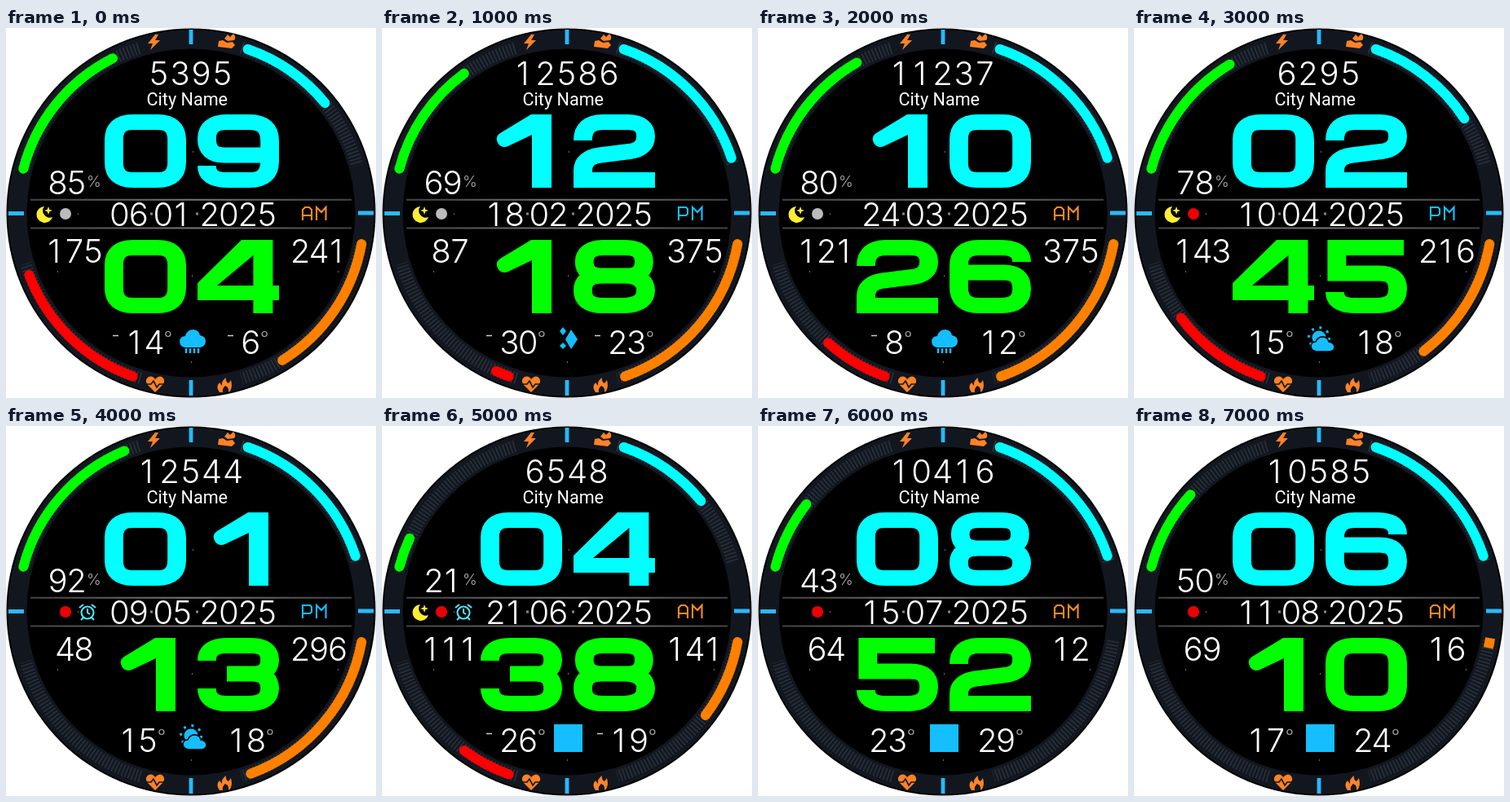
Recreate the animation shown at these times as an HTML page. Size 454 px wide and 454 px high, loop 8000 ms.

```html
<!DOCTYPE html>
<html lang="en">
<head>
<meta charset="utf-8">
<title>Watch face</title>
<style>
  html, body { margin: 0; height: 100%; overflow: hidden; background: #fff; }
  svg { display: block; width: 100vw; height: 100vh; }
  text { fill: #fff; font: 300 40px Inter, sans-serif; text-anchor: middle; }
  .city { font: 400 21.6px Roboto, sans-serif; }
  .percent { font-size: 19px; fill: #aaa; }
  .line { fill: none; stroke-width: 2.1; }
</style>
</head>
<body>
<svg viewBox="0 0 454 454">
  <defs>
    <linearGradient id="rule">
      <stop offset="0" stop-color="#444"/><stop offset=".5" stop-color="#777"/><stop offset="1" stop-color="#444"/>
    </linearGradient>
  </defs>
  <circle cx="227" cy="227" r="226.5"/>
  <circle cx="227" cy="227" r="213" fill="none" stroke="#12171f" stroke-width="23"/>
  <g id="ticks" fill="none" stroke="#28303b" stroke-width="15" stroke-dasharray="1.7 2.6"></g>
  <path d="M227 2V20M227 432V451M3 227.5H22M432 227H451" stroke="#28b9fa" stroke-width="4.8"/>
  <path d="M30 209.7H424V211.7H30ZM30 244.6H424V246.6H30Z" fill="url(#rule)"/>
  <path d="M229 152h1M228 304h1M63 299h1M407 299h1M227 410h1M88 228h1" stroke="#ddd"/>
  <g fill="#ff8228">
    <path d="M183 8L174 19H180L177 27L189 15H183L187 8Z"/>
    <path d="M261 16L266 15L271 18L278 17L281 21L277 25L260 23ZM268 13L272 8L275 11L279 7Q283 11 280 15L272 16Z"/>
    <path d="M183 447L173 437Q170 431 175 428Q180 426 183 431Q187 426 191 428Q196 431 193 437Z"/>
    <path d="M262 447Q257 440 262 435L265 439Q264 433 270 429Q269 434 273 436L276 432Q279 443 273 447Q274 441 269 439Q265 442 266 447Z"/>
  </g>
  <path class="line" d="M172 437H178L181 433L185 441L188 437H195" stroke="#12171f" style="stroke-width:1.7"/>
  <text class="city" x="222.3" y="95">City Name</text>
  <g id="live"></g>
</svg>
<script>
const BLUE = '#14beff', ORANGE = '#fa8c1e';

// Wide numerals, 83.3 x 90, widened by 1.2 when placed
const glyphs = [
  'M29 9.5H54Q73.8 9.5 73.8 31V59Q73.8 80.5 54 80.5H29Q9.5 80.5 9.5 59V31Q9.5 9.5 29 9.5Z',
  'M51.7 0H72.5V90H52.5V25L28 39Q22 42 18 36Q14 28 20 23Z',
  'M9.5 32Q9.5 9.5 30 9.5H55Q73.8 9.5 73.8 27Q73.8 43 57 45.5L27 50Q9.5 53 9.5 69V80.5H83.3',
  'M9.5 28Q9.5 9.5 30 9.5H55Q73.8 9.5 73.8 27T56 44H30M56 44Q73.8 44 73.8 62T53 80.5H30Q9.5 80.5 9.5 62',
  'M45 0H77V56H83.3V74H77V90H57V74H0V53ZM57 19V56H20Z',
  'M80 9.5H11.5V41H55Q73.8 41 73.8 60Q73.8 80.5 53 80.5H30Q9.5 80.5 9.5 64',
  'M73.8 27Q73.8 9.5 53 9.5H30Q9.5 9.5 9.5 32V58Q9.5 80.5 30 80.5H53Q73.8 80.5 73.8 60T55 40H14',
  'M0 9.5H73.8V24L38 90',
  'M30 9.5H53Q72 9.5 72 27T53 44H30Q11 44 11 27T30 9.5ZM30 44H53Q73.8 45 73.8 62T53 80.5H30Q9.5 80.5 9.5 62T30 44Z',
  'M9.5 63Q9.5 80.5 30 80.5H53Q73.8 80.5 73.8 58V32Q73.8 9.5 53 9.5H30Q9.5 9.5 9.5 30T28 50H69'
];

const cloud = 'M220 392Q213 391 213 384Q214 378 220 378Q222 370 230 370Q237 371 238 377Q245 378 245 385Q244 391 238 392Z';
const weather = {
  rain: `<path d="${cloud}" fill="${BLUE}"/><path d="M221 393V399M226 393V399M231 393V399M236 393V399" stroke="${BLUE}" stroke-width="2.5"/>`,
  sleet: `<path d="M232 370L240 382L232 394L225 382ZM222 367L226 372L222 377L218 372ZM222 386L226 390L222 394L218 390Z" fill="${BLUE}"/>`,
  sun: `<circle cx="227" cy="380" r="8.5" fill="${BLUE}"/>
    <circle cx="227" cy="380" r="12.5" fill="none" stroke="${BLUE}" stroke-width="3" stroke-dasharray="3 6.82"/>
    <path d="M224 397Q217 396 217 390Q218 385 223 385Q226 378 233 379Q238 380 239 385Q246 386 246 392Q245 397 240 397Z" fill="${BLUE}" stroke="#000" stroke-width="1.5"/>`,
  plain: `<rect x="211" y="366" width="35" height="34" fill="${BLUE}"/>`
};

const moon = `<path d="M47 219A10 10 0 1 0 57 232A8.5 8.5 0 0 1 47 219ZM52 219L53.3 222.7L57 224L53.3 225.3L52 229L50.7 225.3L47 224L50.7 222.7Z" fill="#ffee32"/>`;
const alarm = `<g class="line" stroke="#50e6ff"><circle cx="100" cy="229" r="7.5"/>
  <path d="M100 224V229L103 231M90 223L95 219M110 223L105 219M95 235L92 238M105 235L108 238"/></g>`;

// time, half, steps, step sweep, battery, day, month, pulse, calories, low, high, weather, moon, link colour, alarm
const states = [
  ['0904', 'AM', 5395, 31.5, 85, '06', '01', 175, 241, -14, -6, 'rain', 1, '#bbb', 0],
  ['1218', 'PM', 12586, 52.4, 69, '18', '02', 87, 375, -30, -23, 'sleet', 1, '#bbb', 0],
  ['1026', 'AM', 11237, 52.4, 80, '24', '03', 121, 375, -8, 12, 'rain', 1, '#bbb', 0],
  ['0245', 'PM', 6295, 37.9, 78, '10', '04', 143, 216, 15, 18, 'sun', 1, '#e00', 0],
  ['0113', 'PM', 12544, 52.4, 92, '09', '05', 48, 296, 15, 18, 'sun', 0, '#e00', 1],
  ['0438', 'AM', 6548, 31.5, 21, '21', '06', 111, 141, -26, -19, 'plain', 1, '#e00', 1],
  ['0852', 'AM', 10416, 52.4, 43, '15', '07', 64, 12, 23, 29, 'plain', 0, '#e00', 0],
  ['0610', 'AM', 10585, 52.4, 50, '11', '08', 69, 16, 17, 24, 'plain', 0, '#e00', 0]
];

function arc(from, to, radius = 212.7) {
  const point = deg => {
    const a = deg * Math.PI / 180;
    return (227 + radius * Math.sin(a)).toFixed(2) + ' ' + (227 - radius * Math.cos(a)).toFixed(2);
  };
  return `M${point(from)}A${radius} ${radius} 0 0 1 ${point(to)}`;
}

function gauge(start, sweep, color) {
  if (sweep <= 0) return '';
  const short = sweep < 1;
  const from = short ? start - 1.3 : start, to = short ? start + 2 : start + sweep;
  return `<path d="${arc(from, to)}" fill="none" stroke="${color}" stroke-width="12" stroke-linecap="${short ? 'butt' : 'round'}"/>`;
}

// Evenly pitched digits centred on x; a 1 sits left in its cell
function digits(value, x, baseline, pitch = 23) {
  const s = String(value);
  const xs = [...s].map((c, i) => x + (i - (s.length - 1) / 2) * pitch - (c === '1' ? 2 : 0));
  return `<text x="${xs.join(' ')}" y="${baseline}">${s}</text>`;
}

function numeral(n, x, y, color) {
  const solid = n === '1' || n === '4';
  const paint = solid ? `fill="${color}" fill-rule="evenodd"` : `fill="none" stroke="${color}" stroke-width="19"`;
  return `<path transform="translate(${x} ${y}) scale(1.2 1)" d="${glyphs[n]}" ${paint}/>`;
}

function temperature(value, base) {
  const s = String(Math.abs(value)), width = 22.7 * s.length;
  const left = base + (value < 0 ? 8 : 0) + (s[0] === '1' ? 3 : 0) + (2 - s.length) * 11;
  const minus = value < 0 ? `<path d="M${left - 17} 377.5h7" stroke="#ccc" stroke-width="1.5"/>` : '';
  return minus + digits(s, left + width / 2, 399.5, 22.7) +
    `<circle cx="${left + width + 5.5}" cy="375.5" r="3" fill="none" stroke="#aaa" stroke-width="1.2"/>`;
}

function half(name) {
  const first = name === 'AM' ? 'M364 236V223L367 220H372L375 223V236M364 230H375' : 'M364 236V220H373L375 222V228L373 230H364';
  return `<path class="line" d="${first}M381 236V220L387 226L392.5 220V236" stroke="${name === 'AM' ? ORANGE : BLUE}"/>`;
}

function face([time, ampm, steps, stepSweep, battery, day, month, pulse, calories, low, high, sky, night, link, bell]) {
  return gauge(-75.2, battery * 0.6 - 2.6, '#0f0') +
    gauge(19.1, stepSweep, '#0ff') +
    gauge(199.6, (pulse - 78) * 0.51, '#f00') +
    gauge(100.3, Math.min(calories, 299) * 0.212 - 3.2, '#ff8000') +
    digits(steps, 226.5, 69.5, 26) +
    [...time].map((n, i) => numeral(n, i % 2 ? 235 : 121, i < 2 ? 106 : 260, i < 2 ? '#0ff' : '#0f0')).join('') +
    digits(battery, 75, 203.5) + '<text class="percent" x="108" y="195">%</text>' +
    digits(day, 151, 242.5, 23.5) + digits(month, 204.5, 242.5, 23.5) + digits(2025, 285, 242.5, 23.5) +
    '<path d="M177 228h3M233 228h3" stroke="#888" stroke-width="3"/>' +
    half(ampm) + digits(pulse, 84, 287.5) + digits(calories, 384, 287.5) +
    temperature(low, 137) + temperature(high, 270) + weather[sky] +
    (night ? moon : '') + `<circle cx="73" cy="228" r="7" fill="${link}"/>` + (bell ? alarm : '');
}

document.getElementById('ticks').innerHTML =
  [[-75, -17], [17, 74], [100, 163], [197, 253]].map(([a, b]) => `<path d="${arc(a, b, 212)}"/>`).join('');

const live = document.getElementById('live');
let shown = -1;
function frame() {
  const index = Math.floor(performance.now() / 1000) % states.length;
  if (index !== shown) live.innerHTML = face(states[shown = index]);
  requestAnimationFrame(frame);
}
frame();
</script>
</body>
</html>
```
